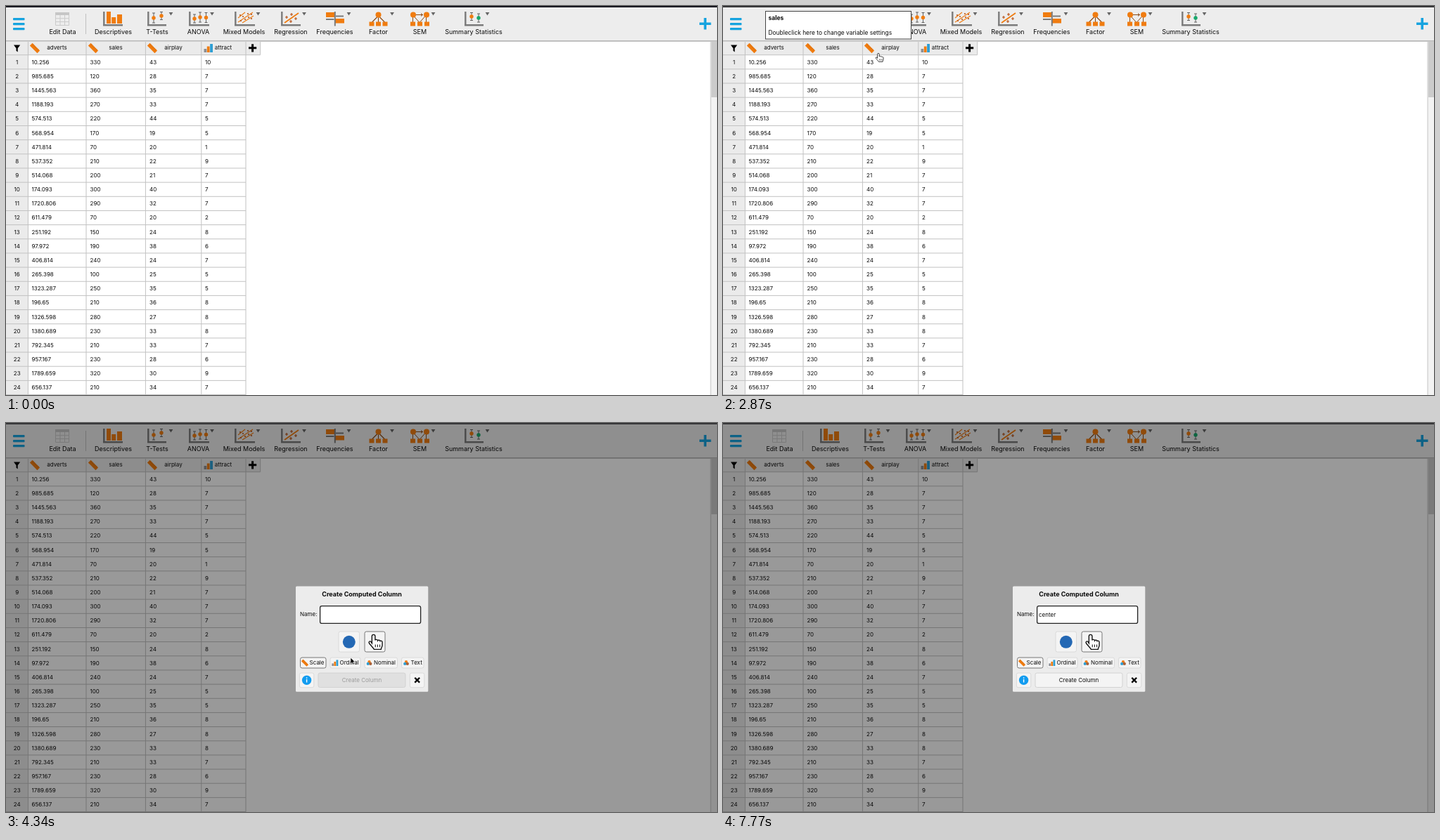
Write an HTML page that moves like this. It is 1011 by 554 pixels and loops after 8000 ms.

```html
<!DOCTYPE html>
<html lang="en">
<head>
<meta charset="utf-8">
<title>Create a computed column</title>
<style>
  html, body { margin: 0; width: 100%; height: 100%; overflow: hidden; background: #fff; }
  svg { display: block; font: 8px Inter, Roboto, sans-serif; fill: #0b0b0b; }
  .bar { font-size: 9px; }
  .mid { text-anchor: middle; }
  .bold { font-weight: 700; }
</style>
</head>
<body>
<svg id="stage" width="1011" height="554" xmlns="http://www.w3.org/2000/svg"></svg>
<script>
const ORANGE = '#f07c10', GRAY = '#7b7b7b', BLUE = '#16a3df', GRID = '#c2c2c2', PANEL = '#ebebeb';
const STEP = 70, LOOP = 8000;

const rect = (x, y, w, h, fill, more = '') =>
  `<rect x="${x}" y="${y}" width="${w}" height="${h}" fill="${fill}" ${more}/>`;
const dot = (x, y, r, fill) => `<circle cx="${x}" cy="${y}" r="${r}" fill="${fill}"/>`;
const path = (d, stroke, w = 1, fill = 'none') =>
  `<path d="${d}" stroke="${stroke}" stroke-width="${w}" fill="${fill}"/>`;
const text = (x, y, s, cls = '', more = '') => `<text x="${x}" y="${y}" class="${cls}" ${more}>${s}</text>`;
const group = (id, body) => `<g id="${id}">${body}</g>`;
const at = (x, y, body, scale = 1) => `<g transform="translate(${x} ${y}) scale(${scale})">${body}</g>`;

// Icons
const axes = w => path(`M1.3 0V18.5M0 19.2H${w}`, GRAY, 2.4);
const errorBar = (x, y, fill = ORANGE, h = 7) =>
  path(`M${x} ${y - h}v${2 * h}m-2 0h4m-4 ${-2 * h}h4`, '#555', .9) + dot(x, y, 2.7, fill);
const cross = (x, y) => path(`M${x - 2} ${y}h4m-2-2v4`, '#b8541a', 1.2);
const boxes = (x, gap) => [0, 1, 2].map(i => rect(x + i * gap, 14.5, 7, 6, ORANGE)).join('');
const ruler = `<g transform="rotate(45)">${rect(-7.5, -2.6, 15, 5.2, ORANGE)}` +
  path('M-5-2.6v2.2M-2.5-2.6v2.2M0-2.6v2.2M2.5-2.6v2.2M5-2.6v2.2', '#c25f08', .7) + '</g>';
const ordinal = rect(-6.5, 1, 3.8, 5, '#8d8f94') + rect(-2.2, -2.5, 3.8, 8.5, ORANGE) + rect(2.1, -6, 3.9, 12, '#2f9fd4');
const nominal = dot(0, -2.2, 3, ORANGE) + dot(-2.4, 1.7, 3, '#2f9fd4') + dot(2.5, 1.7, 3, '#a8613a');
const hand = path('M-1.4 7V1.2a1.3 1.3 0 0 1 2.6 0V4.5c.3-.9 2-.7 2.1.3.4-.7 1.9-.5 2 .4.5-.5 1.7-.2 1.7.8' +
  'V8.5c0 1.5-1 2-1 3.4H.3C-.3 10.5-2.5 8.6-3.6 7c-.8-1.2.6-2.2 1.4-1.2z', '#111', .8, '#fff') +
  path('M1.4 8v2.2M3.2 8v2.2M5 8v2.2', '#111', .6);
const arrow = path('M0 0V9L2 7.2 3.4 10.2 4.9 9.5 3.6 6.5H6.3z', '#fff', .7, '#000');
const beam = path('M-2.3-5.2Q0-5.2 0-3.8Q0-5.2 2.3-5.2M0-4V4M-2.3 5.2Q0 5.2 0 3.8Q0 5.2 2.3 5.2M-1.2 1.6h2.4', '#111', .9);

// Toolbar: label, label centre, icon left, menu arrow x, icon
const tools = [
  ['Edit Data', 80.5, 70, 0, rect(0, 1, 20, 4, '#c6c6c6') +
    path('M.5 5V19.5H19.5V5M0 9.7H20M0 14.5H20M7 5V19M13.5 5V19', '#cbcbcb')],
  ['Descriptives', 152.5, 138, 0, axes(28) + rect(5, 0, 6, 17, ORANGE) + rect(12.2, 8, 6, 9, ORANGE) + rect(20, 4, 7, 13, ORANGE)],
  ['T-Tests', 215, 201, 234.5, axes(27) + errorBar(9, 9) + errorBar(20, 6, ORANGE, 5.5)],
  ['ANOVA', 273.5, 260, 293, axes(29) + errorBar(8, 10, ORANGE, 6) + errorBar(16, 8) + errorBar(24.5, 8.5)],
  ['Mixed Models', 338.5, 325, 358.5, axes(29) + path('M5 9 15 1M5 15 26 1M11 16 27 6', ORANGE, 1.1) +
    [[8, 5], [12, 7], [15, 11], [19, 3], [20, 8], [24, 10], [9, 13], [24, 4]].map(p => dot(...p, 1.1, '#b8541a')).join('')],
  ['Regression', 405, 391, 424, axes(28) + path('M5 16 25 2', ORANGE, 1.8) + cross(8, 8) + cross(15, 4) + cross(14, 14) + cross(21, 10)],
  ['Frequencies', 467.5, 455, 487.5, rect(0, 1, 12, 7, ORANGE) + rect(13, 10, 13, 6.5, ORANGE) +
    path('M12.8 0V20.5', GRAY, 2) + path('M0 11H11.5M14 6.5H25', GRAY, 1.8)],
  ['Factor', 529.5, 516.5, 549, path('M13 6 4 15M13 6V15M13 6 22 15', '#8b4a16', 1.1) + dot(13, 4.5, 4, ORANGE) + boxes(0, 9.5)],
  ['SEM', 588.5, 574.5, 607.5, path('M4 5V15M4 5 13 15M23 5 14 15M23 5V15M8 4.5H18m-2.5-2 2.5 2-2.5 2', '#8b4a16', 1) +
    dot(4.5, 4.5, 4, ORANGE) + dot(23.5, 4.5, 4, ORANGE) + boxes(.5, 10)],
  ['Summary Statistics', 665, 652, 684.5, axes(27) + errorBar(10, 7, ORANGE, 5.5) + errorBar(20, 9, '#17a86b', 6)]
];
const toolbar = rect(0, 2, 1011, 48, '#ededed') + rect(0, 49, 1011, 1.7, '#b5b5b5') +
  [17, 24, 31].map(y => rect(10, y, 16.5, 3.2, BLUE, 'rx=".8"')).join('') +
  path('M113.5 11V40', '#c0c0c0') + path('M986 25.3H1002.5M994.2 17V33.5', BLUE, 3.6) +
  tools.map(([name, cx, x, menu, icon]) => at(x, 8, icon) + text(cx, 40.4, name, 'bar mid') +
    (menu ? path(`M${menu - 2.9} 9h5.8l-2.9 4.6z`, 'none', 0, '#666') : '')).join('');

// Data sheet
const columns = [
  ['adverts', 72.5, 41, 36.5, '10.256 985.685 1445.563 1188.193 574.513 568.954 471.814 537.352 514.068 174.093 1720.806 611.479 ' +
    '251.192 97.972 406.814 265.398 1323.287 196.65 1326.598 1380.689 792.345 957.167 1789.659 656.137'],
  ['sales', 156, 124, 119.5, '330 120 360 270 220 170 70 210 200 300 290 70 150 190 240 100 250 210 280 230 210 230 320 210'],
  ['airplay', 238, 208, 204, '43 28 35 33 44 19 20 22 21 40 32 20 24 38 24 25 35 36 27 33 33 28 30 34'],
  ['attract', 309, 288, 283, '10 7 7 7 5 5 1 9 7 7 7 2 8 6 7 5 5 8 8 8 7 6 9 7']
];
const ROW = 20.16, TOP = 69.7;
const baseline = i => (82.7 + i * ROW).toFixed(2);
let sheet = rect(0, 50.7, 361.5, 19, PANEL) + rect(0, 69, 31, 485, PANEL) +
  group('hover', rect(341.5, 51, 20, 18.5, '#d9d9d9')) +
  path('M31.4 51V554M114 51V554M198.4 51V554M277.8 51V554M341 51V554M361.7 51V69.5M341 69.7h20.7', GRID) +
  path('M11 55.6h9.2l-3.5 4.6v5.2l-2.2-1.6v-3.6z', 'none', 0, '#000') +
  path('M345 59.8h11.2M350.6 54.2v11.2', '#000', 3);
for (let i = 0; i < 24; i++) {
  sheet += path(`M0 ${(TOP + i * ROW).toFixed(2)}H341`, GRID) + text(15.7, baseline(i), i + 1, 'mid');
}
sheet += path('M0 553.5H341', GRID);
for (const [name, cx, iconX, x, values] of columns) {
  sheet += at(iconX, 60, name === 'attract' ? ordinal : ruler) + text(cx, 62.4, name, 'mid') +
    values.split(' ').map((v, i) => text(x, baseline(i), v)).join('');
}
const scrollbar = rect(1002, 51, 9, 503, '#f3f3f3') + path('M1002 51V554', '#c4c4c4') + rect(1003, 51, 8, 79, '#cbcbcb');

const tooltip = rect(60.5, 7.5, 207, 39.5, '#fff', 'stroke="#444"') +
  text(64.5, 20, 'sales', 'bold', 'style="font-size:8.5px"') +
  text(64.5, 41.2, 'Doubleclick here to change variable settings', '', 'style="font-size:8.4px"');

// Dialog
const button = (x, y, w, h, active) =>
  rect(x, y, w, h, '#f4f4f4', `rx="2.5" stroke="${active ? '#777' : '#dadada'}"`);
const kinds = [['Scale', 418.5, 36.5, 425, ruler], ['Ordinal', 461, 43, 468, ordinal],
  ['Nominal', 510, 46.5, 516.5, nominal], ['Text', 562.5, 31.5, 569, nominal]];
const dialog = rect(0, 2, 1011, 552, '#000', 'opacity=".4"') +
  rect(412, 232.5, 188.3, 150.2, '#ececec', 'rx="1.5"') +
  text(506, 247.2, 'Create Computed Column', 'bar bold mid') + text(418, 275.4, 'Name:') +
  rect(446.6, 260.6, 143, 24.8, '#fff', 'rx="2.5" stroke="#222" stroke-width="1.3"') +
  '<text id="name" x="449" y="275.6"></text>' + rect(449, 267, 1, 12, '#111', 'id="caret"') +
  button(473, 297, 29.5, 29) + dot(487.8, 311.8, 9, '#2468b4') +
  button(510, 297, 29, 29, true) + at(522.8, 301.5, hand, 1.75) +
  kinds.map(([name, x, w, iconX, icon], i) => button(x, 334, w, 15, i === 0) +
    at(iconX, 341.7, icon, .72) + text(iconX + 6.6, 344.4, name)).join('') +
  button(417.3, 356, 20.5, 20.7) + dot(427.6, 366.2, 6.7, '#129cf0') +
  path('M427.6 365v4.6M427.6 362.2v1.6', '#fff', 1.4) +
  group('create', rect(444, 356, 124, 20.5, '#f4f4f4', 'rx="2.5" stroke="#d2d2d2"') + text(506, 369, 'Create Column', 'mid')) +
  button(574.3, 356, 20.5, 20.7) + path('M581.3 362.8l6.8 6.8m0-6.8l-6.8 6.8', '#000', 2.3);

stage.innerHTML = rect(0, 0, 1011, 554, '#fff') + toolbar + sheet + scrollbar +
  rect(0, 0, 1011, 2, '#333', 'id="strip"') + group('tip', tooltip) + group('modal', dialog) +
  '<circle id="ring" cx="353.9" cy="68.4" r="20.4" fill="none" stroke="#111" stroke-width="1.2"/>' +
  group('pointer', group('arrow', arrow) + group('hand', hand) + group('beam', beam));

const $ = id => document.getElementById(id);
const show = (id, on) => $(id).setAttribute('display', on ? 'inline' : 'none');

// Pointer stops: time, x, y
const stops = [[280, 496, 575], [560, 390, 258], [770, 390, 258], [980, 264.5, 106], [1120, 264.5, 106],
  [1960, 157.5, 58], [2730, 157.5, 58], [2870, 221, 67.5], [3500, 353.5, 68.5], [3920, 354, 68.5],
  [4340, 490, 334], [4690, 486, 268]];
const keys = [[5670, 'c'], [5880, 'e'], [6020, 'n'], [6160, 't'], [7420, 'e'], [7490, 'r']];

function pointerAt(t) {
  const i = stops.findIndex(s => s[0] > t);
  if (i < 0) return stops[stops.length - 1].slice(1);
  if (i === 0) return stops[0].slice(1);
  const [t0, x0, y0] = stops[i - 1], [t1, x1, y1] = stops[i];
  const p = 1 - (1 - (t - t0) / (t1 - t0)) ** 2;
  return [x0 + (x1 - x0) * p, y0 + (y1 - y0) * p];
}

function caretOn(t) {
  if (t < 5670) return (t - 3640) % 980 < 490;
  return t < 6720 || (t >= 7210 && t < 7770);
}

function draw(now) {
  const t = Math.floor(now % LOOP / STEP) * STEP;
  const [x, y] = pointerAt(t);
  const modal = t >= 3640;
  const inField = modal && x > 447 && x < 590 && y > 260 && y < 286;
  const onHeader = !modal && y > 50 && y < 70 && x < 362;

  $('strip').setAttribute('fill', t < 1190 ? '#1a1a22' : '#363638');
  show('tip', t >= 2310 && t < 2940);
  show('ring', t >= 3500 && !modal);
  show('hover', onHeader && x > 341);
  show('modal', modal);
  show('pointer', t >= 350 && t < 5670);
  show('arrow', !inField && !onHeader);
  show('hand', onHeader);
  show('beam', inField);
  $('pointer').setAttribute('transform', `translate(${x} ${y})`);

  const label = $('name');
  label.textContent = keys.filter(k => k[0] <= t).map(k => k[1]).join('');
  show('caret', modal && caretOn(t));
  $('caret').setAttribute('x', 449 + (modal && label.textContent ? label.getComputedTextLength() : 0));
  const ready = t >= 5740;
  $('create').firstChild.setAttribute('fill', ready ? '#f4f4f4' : '#e0e0e0');
  $('create').lastChild.setAttribute('fill', ready ? '#0b0b0b' : '#9c9c9c');
}

let start;
function tick(now) {
  start ??= now;
  draw(now - start);
  requestAnimationFrame(tick);
}
draw(0);
requestAnimationFrame(tick);
</script>
</body>
</html>
```
